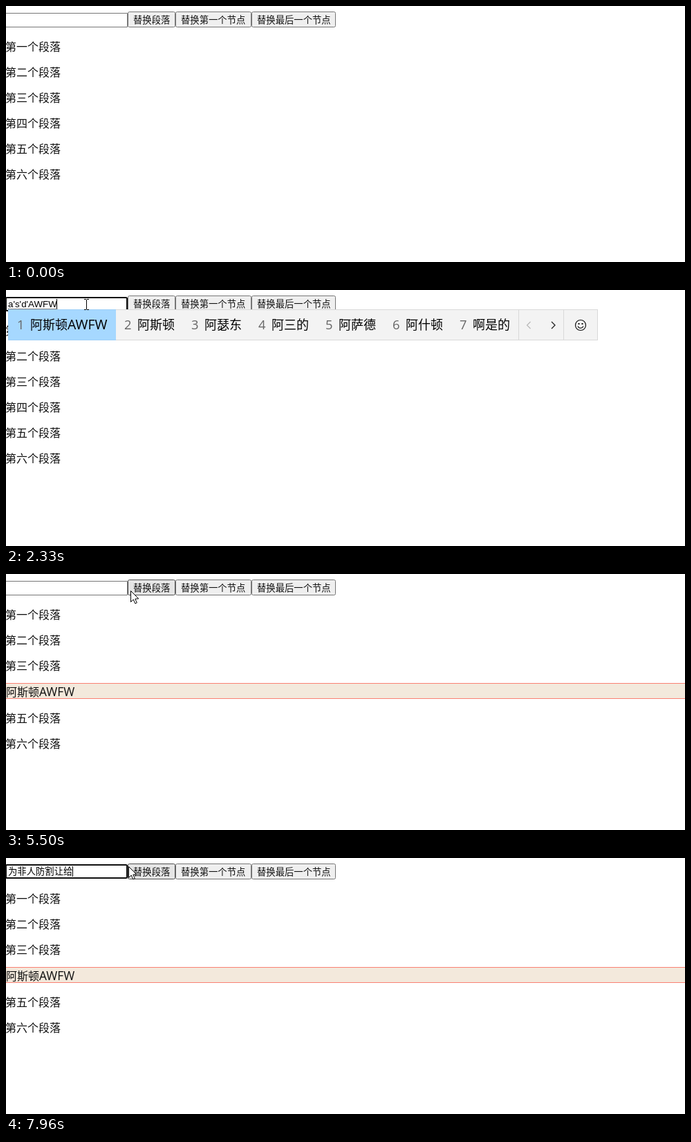
These frames come from a looping animation (982x371 px, 8 s). An HTML page with a canvas:

```html
<!DOCTYPE html>
<html lang="zh-CN">
<head>
<meta charset="utf-8">
<style>
  html, body { margin: 0; width: 100%; height: 100%; overflow: hidden; background: #fff; }
  canvas { display: block; }
</style>
</head>
<body>
<canvas id="stage" width="982" height="371"></canvas>
<script>
const ctx = document.getElementById('stage').getContext('2d');
const LOOP = 8000;
const CJK = '"Noto Sans CJK SC", "Noto Sans CJK", sans-serif';
const UI = ['"Open Sans", "Noto Sans", sans-serif', 1.08];
const FORM = ['"Liberation Sans", sans-serif', 1];
const FORM_SIZE = 13.333;

const PICK = 3750, REPLACE = 4950;
const FOCUS = [[680, PICK], [5790, LOOP]];
const asd = '阿斯顿 阿瑟东 阿三的 阿萨德 阿什顿 啊是的';
const wei = '微风 威风 微分 文风 文峰 为非';

// time, field text, candidates while composing, delay before the list resizes
const strokes = [
  [0, ''],
  [1180, "a's", '按时 阿萨 阿三 爱上 暗示 啊是 暗杀', 50],
  [1230, "a's'd", asd + ' 暗示的', 50],
  [1740, "a's'd'A", '阿斯顿A ' + asd, 0],
  [2020, "a's'd'AW", '阿斯顿AW ' + asd, 40],
  [2110, "a's'd'AWF", '阿斯顿AWF ' + asd, 40],
  [2300, "a's'd'AWFW", '阿斯顿AWFW ' + asd, 30],
  [2710, '阿斯顿AWFW'],
  [REPLACE, ''],
  [6750, 'w', '我 为 位 无 玩 五 问', 0],
  [6790, 'we', '为 位 未 微 喂 围 味', 0],
  [6840, "we'f", '微风 为否 未付 威风 微服 违法 为非', 40],
  [6890, "we'fe", wei + ' 违反', 40],
  [7110, "we'fe'r", '微风人 ' + wei, 50],
  [7310, "we'fe'r'f", '微风人防 ' + wei, 40],
  [7350, "we'fe'r'f'g", '微风人防割 ' + wei, 50],
  [7400, "we'fe'r'f'g'r", '微风人防割让 ' + wei, 50],
  [7620, "we'fe'r'f'g'r'g", '为非人防割让给 ' + wei, 50],
  [7760, '为非人防割让给'],
];

// pointer: time, x, y
const path = [
  [30, 776, 335], [180, 610, 235], [330, 390, 130], [480, 220, 60], [600, 140, 28], [680, 116, 21],
  [2710, 116, 21], [3100, 136, 75], [3500, 150, 151], [3650, 152, 166], [3900, 152, 166],
  [4120, 225, 100], [4330, 285, 41], [4380, 282, 36], [4550, 260, 24], [4800, 200, 20],
  [5350, 200, 20], [5500, 180, 24], [5780, 149, 17], [6560, 149, 17], [6570, 149, 15],
  [6750, 149, 12], [6890, 147, 9], [7760, 147, 9], [7950, 177, 12], [LOOP, 177, 12],
];

const buttons = [[176, 69, '替换段落'], [245, 110, '替换第一个节点'], [355, 122, '替换最后一个节点']];

// Draws mixed Chinese and Latin text and returns its width.
function text(str, x, y, size, [latin, scale], color = '#000', draw = true) {
  const start = x;
  ctx.fillStyle = color;
  for (const run of str.match(/[\x20-\x7e]+|[^\x20-\x7e]+/g) || []) {
    ctx.font = run < '\x7f' ? `${size * scale}px ${latin}` : `${size}px ${CJK}`;
    if (draw) ctx.fillText(run, x, y);
    x += ctx.measureText(run).width;
  }
  return x - start;
}

function rect(x, y, w, h, color) {
  ctx.fillStyle = color;
  ctx.fillRect(x, y, w, h);
}

function box(x, y, w, h, r, line, fill, width = 1) {
  ctx.beginPath();
  ctx.roundRect(x, y, w, h, r);
  ctx.fillStyle = fill;
  ctx.fill();
  ctx.strokeStyle = line;
  ctx.lineWidth = width;
  ctx.stroke();
}

function polyline(points, color, width = 1) {
  ctx.beginPath();
  for (let i = 0; i < points.length; i += 2) ctx.lineTo(points[i], points[i + 1]);
  ctx.strokeStyle = color;
  ctx.lineWidth = width;
  ctx.stroke();
}

function pointerAt(t) {
  const i = path.findIndex(p => p[0] > t);
  if (i < 1) return null;
  const [t0, x0, y0] = path[i - 1], [t1, x1, y1] = path[i];
  const k = (t - t0) / (t1 - t0);
  return [Math.round(x0 + (x1 - x0) * k), Math.round(y0 + (y1 - y0) * k)];
}

const inField = p => p && p[0] < 176 && p[1] >= 10 && p[1] < 31;

function drawPointer(p) {
  if (!p) return;
  ctx.save();
  ctx.translate(...p);
  if (inField(p)) {
    rect(0, -7, 1, 14, '#000');
    for (const y of [-8, 7]) {
      rect(-3, y, 3, 1, '#000');
      rect(1, y, 3, 1, '#000');
    }
  } else {
    ctx.translate(.5, .5);
    ctx.beginPath();
    for (const [x, y] of [[0, 0], [0, 16], [3.7, 12.5], [6.3, 18.3], [8.8, 17.2], [6.3, 11.6], [11.3, 11.3]]) ctx.lineTo(x, y);
    ctx.closePath();
    ctx.fillStyle = '#fff';
    ctx.fill();
    ctx.strokeStyle = '#000';
    ctx.lineWidth = 1;
    ctx.stroke();
  }
  ctx.restore();
}

function drawParagraphs(t) {
  [...'一二三四五六'].forEach((n, i) => {
    let label = `第${n}个段落`, x = -1, y = 65 + 37 * i;
    if (t >= PICK && i > 2) {
      y += i > 3 ? 2 : 1;
      if (i === 3) {
        rect(0, 158, 982, 23, '#fa8072');
        rect(0, 159, 982, 21, '#f3e9dc');
        x = 0;
        if (t >= REPLACE) label = '阿斯顿AWFW';
      }
    }
    text(label, x, y, 16, UI, '#111');
  });
}

function drawButtons(p) {
  for (const [x, w, label] of buttons) {
    const hover = p && p[0] >= x && p[0] < x + w && p[1] >= 8 && p[1] < 31;
    box(x + .5, 8.5, w - 1, 22, 2, hover ? '#4f4f4f' : '#767676', hover ? '#e5e5e5' : '#efefef');
    text(label, x + 8, 25, FORM_SIZE, FORM, '#111');
  }
}

function drawField(t, [since, value, list]) {
  const focus = FOCUS.find(([a, b]) => t >= a && t < b);
  const up = value && !list ? 1 : 0;
  if (focus) box(0, 11 - up, 175, 19, 1.5, '#101010', '#fff', 2);
  else box(-.5, 10.5 - up, 176, 20, 0, '#767676', '#fff');
  const end = 3 + text(value, 3, 25 - up, FORM_SIZE, FORM);
  if (list) {
    ctx.setLineDash([1, 1]);
    polyline([3, 27.5, end, 27.5], '#000');
    ctx.setLineDash([]);
  }
  const idle = focus ? t - Math.max(since, focus[0]) : 0;
  if (focus && (list || idle % 1000 < 500)) rect(Math.floor(end), 13 - up, 1, 15, '#000');
}

const itemWidth = word => Math.ceil(42.99 + text(word, 0, 0, 18, UI, '#000', false));
const listEnd = list => list.split(' ').reduce((x, word) => x + itemWidth(word), 4) + 115;

function drawCandidates(t, i) {
  const [since, , list, lag] = strokes[i];
  if (!list) return;
  const right = listEnd(list), before = strokes[i - 1][2];
  const shown = t < since + lag ? (before ? listEnd(before) : 546) : right;
  ctx.save();
  ctx.beginPath();
  ctx.rect(3, 28, shown - 3, 45);
  ctx.clip();
  rect(3, 28, right - 3, 45, '#d9d9d9');
  rect(4, 29, right - 5, 43, '#f3f3f3');
  let x = 4;
  list.split(' ').forEach((word, n) => {
    const w = itemWidth(word);
    if (!n) {
      rect(3, 28, w + 1, 45, '#9fd0f7');
      rect(4, 29, w, 43, '#a6d8ff');
    }
    text(String(n + 1), x + 12, 57, 17, UI, '#666');
    text(word, x + 31, 57, 18, UI);
    x += w;
  });
  rect(x, 29, 1, 43, '#d9d9d9');
  rect(x + 65, 29, 1, 43, '#d9d9d9');
  polyline([x + 17.5, 46, x + 12.5, 51, x + 17.5, 56], '#b5b5b5', 1.1);
  polyline([x + 48, 46, x + 53, 51, x + 48, 56], '#222', 1.3);
  ctx.translate(x + 90, 51);
  for (const [r, a, b] of [[7.5, 0, 7], [4.2, .35, Math.PI - .35]]) {
    ctx.beginPath();
    ctx.arc(0, 0, r, a, b);
    ctx.strokeStyle = '#111';
    ctx.lineWidth = 1.2;
    ctx.stroke();
  }
  rect(-3.5, -3, 2, 2, '#111');
  rect(1.5, -3, 2, 2, '#111');
  ctx.restore();
}

function render(t) {
  const p = pointerAt(t);
  const i = strokes.findLastIndex(s => s[0] <= t);
  rect(0, 0, 982, 371, '#fff');
  drawParagraphs(t);
  drawButtons(p);
  drawField(t, strokes[i]);
  drawCandidates(t, i);
  drawPointer(p);
}

function loop() {
  render(performance.now() % LOOP);
  requestAnimationFrame(loop);
}
loop();
</script>
</body>
</html>
```
